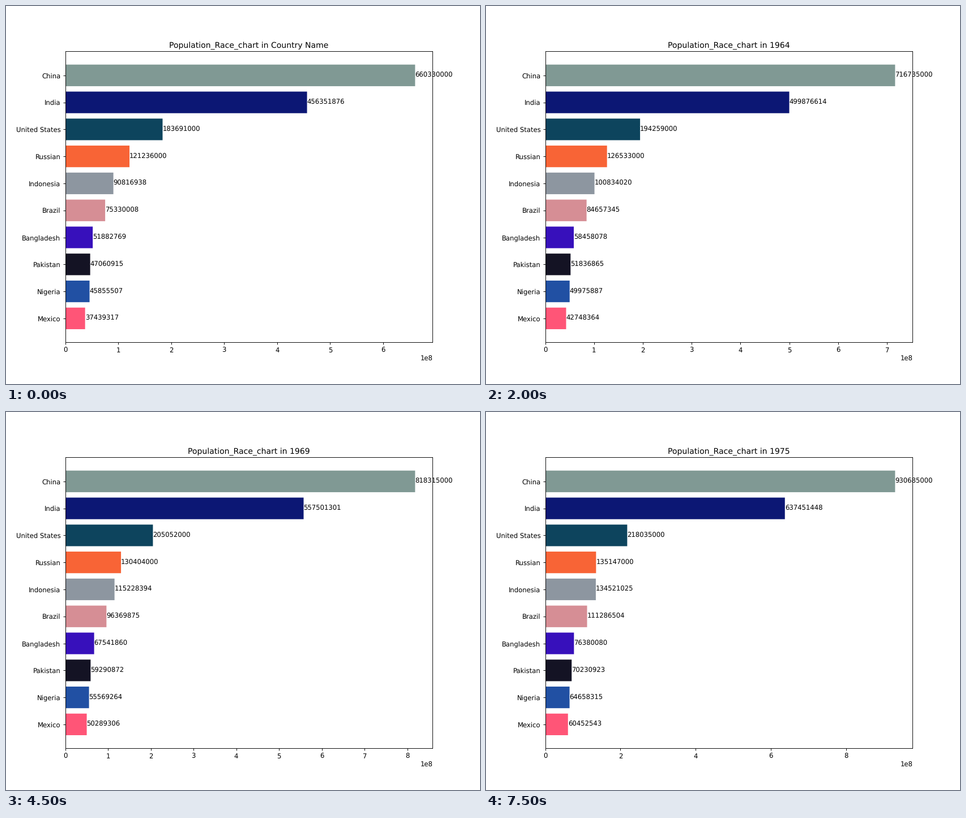
These frames come from a looping animation (837x669 px, 8 s). A matplotlib script:

```python
import matplotlib.pyplot as plt
import numpy as np
from matplotlib.animation import FuncAnimation

W, H, DPI = 837, 669, 83.7
STEPS, INTERVAL = 16, 500
KEY_STEPS = [0, 5, 9, 15]

# name: colour, rounding unit, counts at the key steps
COUNTRIES = {
    "China": ("#809994", 5000, [660330000, 735400000, 818315000, 930685000]),
    "India": ("#0c1774", 1, [456351876, 510992617, 557501301, 637451448]),
    "United States": ("#0d445d", 1000, [183691000, 196560000, 205052000, 218035000]),
    "Russian": ("#f86436", 1000, [121236000, 127468000, 130404000, 135147000]),
    "Indonesia": ("#8d96a0", 1, [90816938, 103561105, 115228394, 134521025]),
    "Brazil": ("#d68e95", 1, [75330008, 86979283, 96369875, 111286504]),
    "Bangladesh": ("#3710bb", 1, [51882769, 60265259, 67541860, 76380080]),
    "Pakistan": ("#141324", 1, [47060915, 53199414, 59290872, 70230923]),
    "Nigeria": ("#2150a3", 1, [45855507, 51020296, 55569264, 64658315]),
    "Mexico": ("#ff5577", 1, [37439317, 44180437, 50289306, 60452543]),
}


def growth(counts, unit):
    """Cubic growth curve through the key counts, one value per step."""
    curve = np.polyval(np.polyfit(KEY_STEPS, counts, 3), np.arange(STEPS))
    return np.rint(curve / unit).astype(int) * unit


names = list(COUNTRIES)
colors = [color for color, _, _ in COUNTRIES.values()]
table = np.array([growth(counts, unit) for _, unit, counts in COUNTRIES.values()])

plt.rcParams.update({"font.family": "DejaVu Sans", "text.hinting": "none"})
fig, ax = plt.subplots(figsize=((W + 1e-6) / DPI, (H + 1e-6) / DPI), dpi=DPI)


def draw(step):
    ax.clear()
    values = table[:, step]
    ax.barh(names, values, color=colors, snap=False)
    ax.invert_yaxis()
    for row, value in enumerate(values):
        ax.text(value, row, str(value), va="center")
    label = 1960 + step if step else "Country Name"
    ax.set_title(f"Population_Race_chart in {label}")


anim = FuncAnimation(fig, draw, frames=STEPS, interval=INTERVAL,
                     init_func=lambda: draw(0), repeat=True, repeat_delay=0)
plt.show()
```
